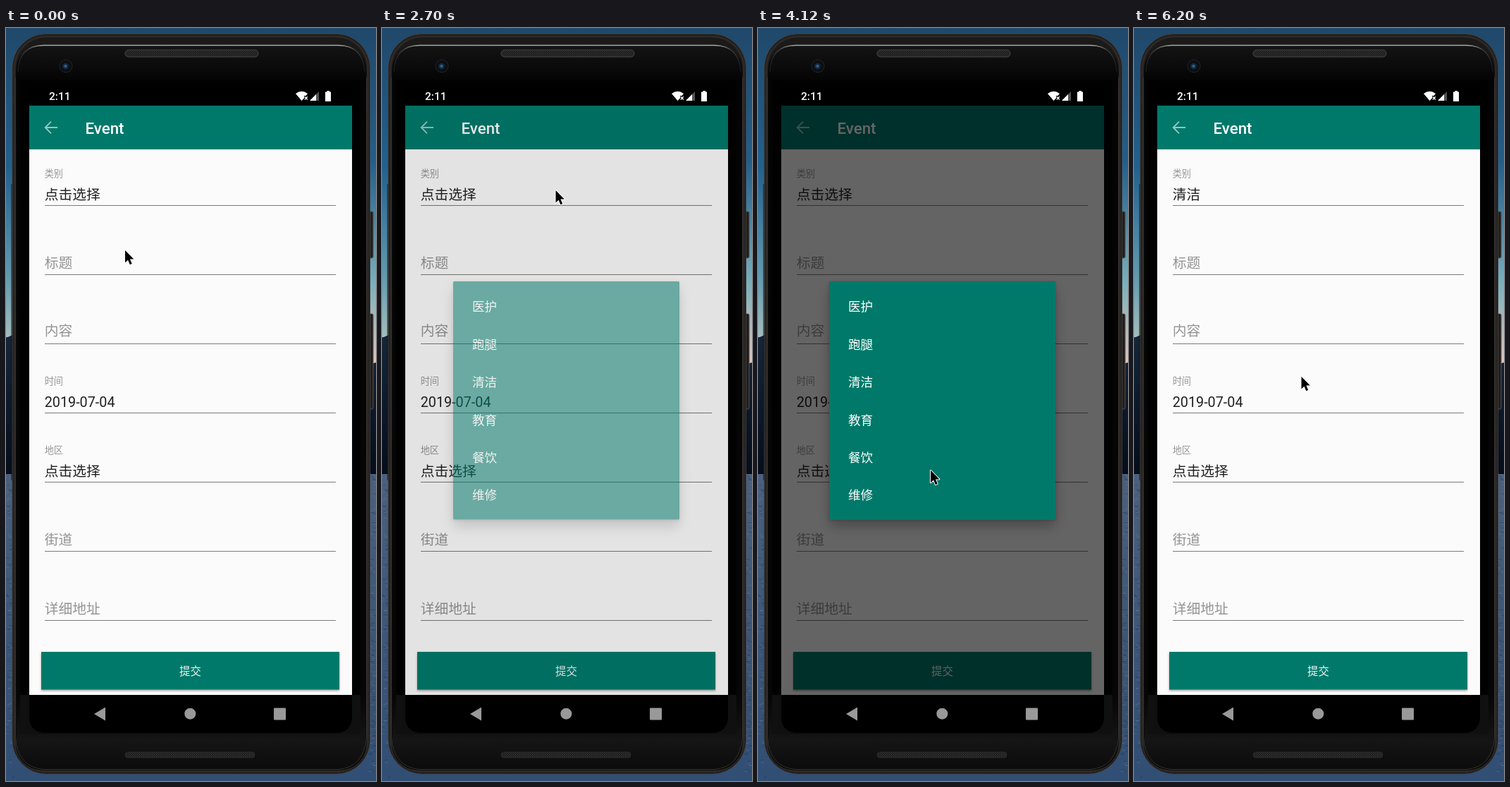
An HTML page for the animation above (8200 ms loop, 525 px wide and 1067 px high).

```html
<!DOCTYPE html>
<html lang="zh-CN">
<head>
<meta charset="utf-8">
<title>Event</title>
<style>
  html, body { margin: 0; width: 100%; height: 100%; overflow: hidden; background: #3a5577; }
  svg { display: block; width: 525px; height: 1067px; }
  text { font-family: Roboto, "Noto Sans CJK SC", "Noto Sans CJK", sans-serif; }
  .label { font-size: 13.2px; fill: #969696; }
  .hint { font-size: 19.8px; fill: #949494; }
  .value { font-size: 19.8px; fill: #202020; }
  .item { font-size: 17.6px; fill: #fff; }
  .bold { font-weight: 500; fill: #fff; }
</style>
</head>
<body>
<svg viewBox="0 0 525 1067">
  <defs>
    <linearGradient id="skyL" x2="0" y2="1">
      <stop offset="0" stop-color="#20486a"/>
      <stop offset=".45" stop-color="#23618d"/>
      <stop offset=".8" stop-color="#6199ae"/>
      <stop offset="1" stop-color="#a3bdbd"/>
    </linearGradient>
    <linearGradient id="skyR" x2="0" y2="1">
      <stop offset="0" stop-color="#20486a"/>
      <stop offset=".4" stop-color="#225f8c"/>
      <stop offset=".75" stop-color="#76aebb"/>
      <stop offset="1" stop-color="#e2c6bb"/>
    </linearGradient>
    <linearGradient id="hill" x2="0" y2="1">
      <stop offset="0" stop-color="#16263a"/>
      <stop offset="1" stop-color="#050d1a"/>
    </linearGradient>
    <linearGradient id="water" x2="0" y2="1">
      <stop offset="0" stop-color="#4a607d"/>
      <stop offset="1" stop-color="#314e74"/>
    </linearGradient>
    <linearGradient id="body" x2="0" y2="1">
      <stop offset="0" stop-color="#141414"/>
      <stop offset=".05" stop-color="#040404"/>
      <stop offset=".9" stop-color="#060606"/>
      <stop offset=".96" stop-color="#151515"/>
      <stop offset="1" stop-color="#0b0b0b"/>
    </linearGradient>
    <linearGradient id="gloss">
      <stop offset="0" stop-color="#555" stop-opacity=".2"/>
      <stop offset=".07" stop-color="#aaa"/>
      <stop offset=".93" stop-color="#aaa"/>
      <stop offset="1" stop-color="#555" stop-opacity=".2"/>
    </linearGradient>
    <radialGradient id="lens">
      <stop offset="0" stop-color="#4a82b4"/>
      <stop offset=".45" stop-color="#16324f"/>
      <stop offset="1" stop-color="#0a0d12"/>
    </radialGradient>
    <pattern id="mesh" width="3" height="3" patternUnits="userSpaceOnUse">
      <rect width="3" height="3" fill="#161616"/>
      <rect width="1.3" height="1.3" fill="#424242"/>
      <rect x="1.5" y="1.5" width="1.3" height="1.3" fill="#3a3a3a"/>
    </pattern>
    <filter id="lift" x="-20%" y="-20%" width="140%" height="140%">
      <feDropShadow dx="0" dy="10" stdDeviation="9" flood-opacity=".22"/>
      <feDropShadow dx="0" dy="1" stdDeviation="2" flood-opacity=".2"/>
    </filter>
    <filter id="low" x="-5%" y="-20%" width="110%" height="150%">
      <feDropShadow dx="0" dy="1.5" stdDeviation="1.5" flood-opacity=".4"/>
    </filter>
  </defs>

  <rect width="262" height="438" fill="url(#skyL)"/>
  <rect x="262" width="263" height="476" fill="url(#skyR)"/>
  <path d="M0 439L12 434L260 476L512 478L525 474V633H0Z" fill="url(#hill)"/>
  <rect y="632" width="525" height="435" fill="url(#water)"/>
  <g id="waves" stroke-width="1.2"></g>

  <rect x="515" y="260" width="6" height="66" rx="2" fill="#211f1e" stroke="#575250"/>
  <rect x="515" y="405" width="6" height="135" rx="2" fill="#211f1e" stroke="#575250"/>
  <rect x="7" y="221" width="4" height="420" fill="#09121c" opacity=".5"/>
  <rect x="9" y="8.5" width="507.5" height="1048.5" rx="48" fill="#1b1a19" stroke="#413d3a"/>
  <rect x="12" y="12" width="501.500" height="1041.500" rx="45" fill="none" stroke="#2c2927" stroke-width="3"/>
  <rect x="14.500" y="24" width="496.500" height="1027" rx="36" fill="url(#body)" stroke="#0a0a0a"/>
  <path d="M17 62Q18 25 53 24.500H472Q507 25 509 62" fill="none" stroke="url(#gloss)" stroke-width="1.500"/>
  <path d="M13.500 70V1005Q16 1047 53 1050.500H472Q508 1047 511.500 1005V70" fill="none" stroke="#34312f"/>
  <rect x="20" y="74" width="483" height="926" fill="#010101"/>
  <rect x="169" y="31" width="189" height="10" rx="5" fill="url(#mesh)" stroke="#474747"/>
  <rect x="169" y="1026" width="184" height="8" rx="4" fill="url(#mesh)" stroke="#292929"/>
  <circle cx="85" cy="54" r="9" fill="#0b0d10" stroke="#262626"/>
  <circle cx="84.500" cy="54" r="5.500" fill="url(#lens)"/>

  <path d="M20 945H503V1001H20Z" fill="#101010"/>
  <path d="M33 83H491V975Q491 999 467 999H57Q33 999 33 975Z"/>
  <text class="bold" x="61" y="102.300" font-size="15.500">2:11</text>
  <path d="M411 93Q419.500 86.500 428 93L425.500 96H423V99.500L419.500 103Z" fill="#fff"/>
  <path d="M423.800 97.300L427.800 101.500M427.800 97.300L423.800 101.500" stroke="#fff" stroke-width="1.300"/>
  <path d="M444 90V103H431Z" fill="#555"/>
  <path d="M440 94V103H431Z" fill="#fff"/>
  <path d="M455.500 89H459V90.500H461V104H453V90.500H455.500Z" fill="#fff"/>
  <g fill="#999">
    <path d="M125 972L141 962.500V981.500Z"/>
    <circle cx="261.300" cy="971.700" r="8"/>
    <rect x="380" y="963.500" width="17" height="17" rx="1"/>
  </g>

  <rect x="33" y="110" width="458" height="835" fill="#fbfbfb"/>
  <rect x="33" y="110" width="458" height="62" fill="#00796b"/>
  <path d="M73 141H56M64 132.700L55.700 141L64 149.300" fill="none" stroke="#fff" stroke-opacity=".58" stroke-width="1.900"/>
  <text class="bold" x="112.500" y="149.500" font-size="22.300">Event</text>
  <g id="form"></g>
  <rect x="50" y="884" width="423" height="53.500" fill="#00796b" filter="url(#low)"/>
  <text x="261.500" y="916.800" text-anchor="middle" font-size="15.400" fill="#f0f7f6">提交</text>

  <rect id="dim" x="33" y="110" width="458" height="835" opacity="0"/>
  <g id="dialog" opacity="0">
    <rect x="101" y="359" width="321" height="337.500" rx="1.500" fill="#00796b" filter="url(#lift)"/>
  </g>
  <path id="cursor" d="M0 0V17.500L4 13.700L6.800 20.300L9.700 19L6.900 12.600H12.300Z" stroke="#fff" stroke-width="2" paint-order="stroke" stroke-linejoin="round"/>
</svg>
<script>
const LOOP = 8200;
const $ = id => document.getElementById(id);

function add(parent, tag, attrs, text = "") {
  const el = document.createElementNS("http://www.w3.org/2000/svg", tag);
  for (const k in attrs) el.setAttribute(k, attrs[k]);
  el.textContent = text;
  return parent.appendChild(el);
}

// [label, value] or [hint]
const fields = [
  ["类别", "点击选择"], ["标题"], ["内容"], ["时间", "2019-07-04"],
  ["地区", "点击选择"], ["街道"], ["详细地址"]
];
const values = fields.map(([name, value], i) => {
  const y = 251.5 + 98 * i;
  add($("form"), "path", { d: `M55 ${y}H468`, stroke: "#7b7b7b" });
  if (!value) {
    add($("form"), "text", { class: "hint", x: 54.7, y: y - (i === 2 ? 11.5 : 10) }, name);
    return null;
  }
  add($("form"), "text", { class: "label", x: 54.7, y: y - 40.5 }, name);
  return add($("form"), "text", { class: "value", x: 54.7, y: y - 8.3 }, value);
});

["医护", "跑腿", "清洁", "教育", "餐饮", "维修"].forEach((name, i) =>
  add($("dialog"), "text", { class: "item", x: 128, y: 401.3 + 53.4 * i }, name));

let seed = 7;
const rnd = () => (seed = seed * 16807 % 2147483647) / 2147483647;
for (let i = 0; i < 260; i++) {
  const x = (rnd() < .5 ? 0 : 514) + rnd() * 8, y = 634 + rnd() * 430;
  add($("waves"), "path", {
    d: `M${x} ${y}h${2 + rnd() * 4}`, stroke: rnd() < .5 ? "#5a7192" : "#263f62", opacity: .55
  });
}

const dimKeys = [[2640, 0], [3020, .59], [3060, .6], [5200, .6], [5320, .65], [5600, .19], [5716, 0]];
const dialogKeys = [[2640, 0], [2700, .52], [2760, 1], [5280, 1], [5320, .92], [5600, .04], [5640, 0]];
const cursorKeys = [
  [0, 169, 315], [120, 169, 315], [760, 213, 265], [900, 227, 251], [1100, 227, 251],
  [1700, 246.5, 230], [3400, 246.5, 230], [4200, 245, 638], [4300, 245, 638], [4760, 237.5, 494]
];

function at(keys, t, ease = p => p) {
  const n = keys.findIndex(k => k[0] > t);
  if (n < 0) return keys[keys.length - 1].slice(1);
  if (n === 0) return keys[0].slice(1);
  const a = keys[n - 1], b = keys[n], p = ease((t - a[0]) / (b[0] - a[0]));
  return a.slice(1).map((v, i) => v + (b[i + 1] - v) * p);
}
const smooth = p => p * p * (3 - 2 * p);

function draw() {
  const t = performance.now() % LOOP;
  $("dim").setAttribute("opacity", at(dimKeys, t)[0]);
  $("dialog").setAttribute("opacity", at(dialogKeys, t)[0]);
  $("cursor").setAttribute("transform", `translate(${at(cursorKeys, t, smooth)})`);
  const choice = t < 5260 ? "点击选择" : "清洁";
  if (values[0].textContent !== choice) values[0].textContent = choice;
  requestAnimationFrame(draw);
}
draw();
</script>
</body>
</html>
```
